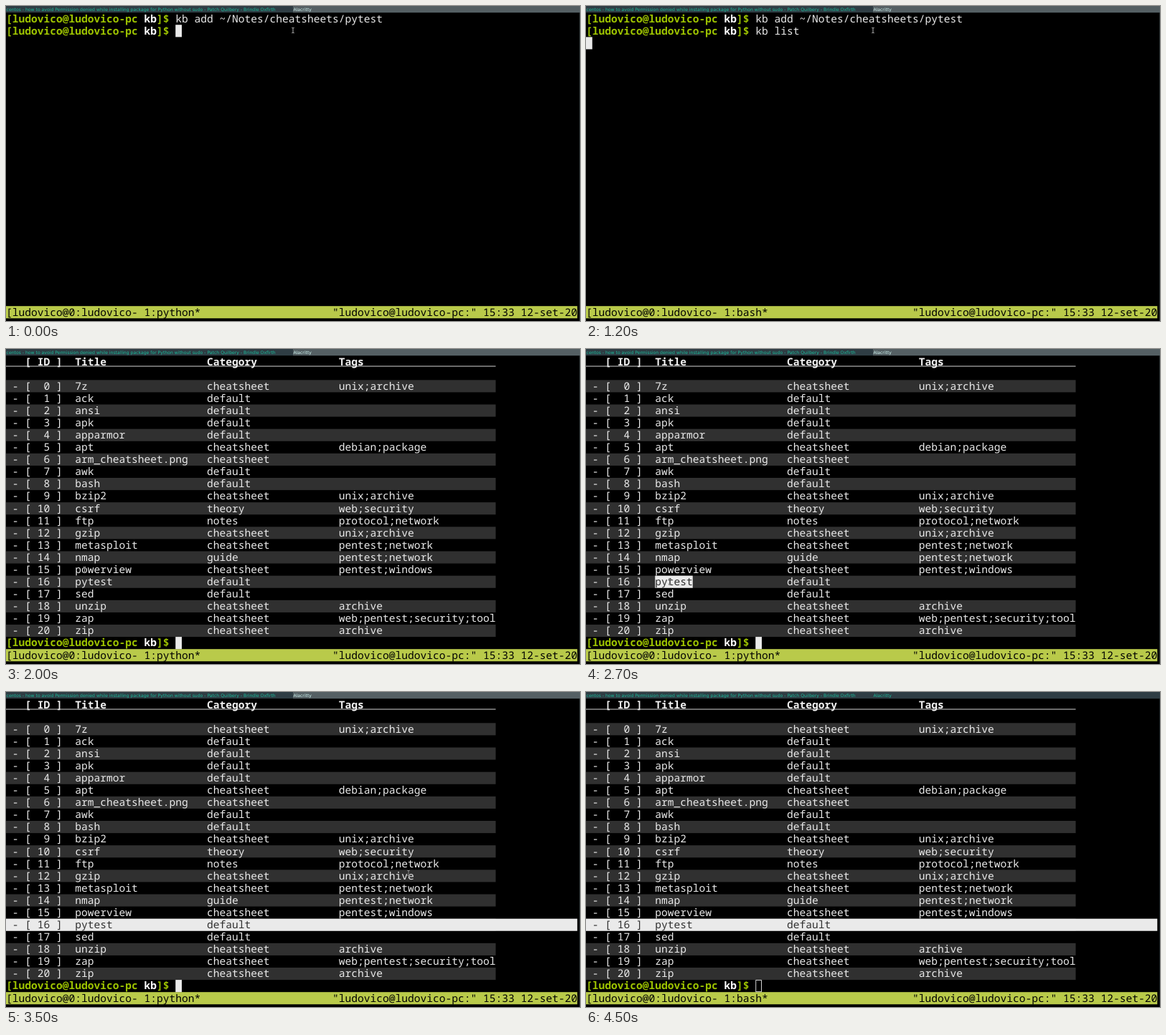
An HTML page for the animation above (5.3 s loop, 800 by 440 pixels).

```html
<!DOCTYPE html>
<html lang="en">
<head>
<meta charset="utf-8">
<title>Terminal listing</title>
<style>
html, body { margin: 0; width: 800px; height: 440px; overflow: hidden; background: #000; }
svg { display: block; }
text { white-space: pre; text-rendering: geometricPrecision; }
.mono { font: 14.5833px "Noto Sans Mono", "DejaVu Sans Mono", monospace; }
.bar { font: 6.11px "DejaVu Sans", sans-serif; }
.bold { font-weight: 700; }
</style>
</head>
<body>
<svg id="stage" width="800" height="440" viewBox="0 0 800 440"></svg>
<script>
const LOOP = 5300, CW = 8.75, RH = 17.0833, TOP = 9.1667;
const FG = '#eaeaea', GREEN = '#9ec400', LIME = '#b9ca4a', STRIPE = '#303030';
const BAR = '#2f3d44', BAR_ON = '#556064', TEAL = '#1abc9c', PALE = '#d0f6f3';
const USER = 'ludovico', HOST = USER + '-pc';
const stage = document.getElementById('stage');

function add(parent, tag, attrs, str) {
  const el = document.createElementNS('http://www.w3.org/2000/svg', tag);
  for (const k in attrs) el.setAttribute(k, attrs[k]);
  if (str !== undefined) el.textContent = str;
  parent.appendChild(el);
  return el;
}
const group = () => add(stage, 'g', {});
const rowY = row => TOP + row * RH;

// Terminal cells: text and background blocks by column and row
function put(parent, col, row, str, fill = FG, bold = false) {
  return add(parent, 'text', {
    x: col * CW, y: rowY(row) + 13.4, fill, class: bold ? 'mono bold' : 'mono'
  }, str);
}
function block(parent, col, row, cols, fill) {
  return add(parent, 'rect', { x: col * CW, y: rowY(row), width: cols * CW, height: RH, fill });
}
function prompt(parent, row) {
  put(parent, 0, row, `[${USER}@${HOST}`, GREEN, true);
  put(parent, 22, row, 'kb', '#fff', true);
  put(parent, 24, row, ']$', GREEN, true);
}
function show(el, on) { el.style.display = on ? '' : 'none'; }

add(stage, 'rect', { width: 800, height: 440, fill: '#000' });

// Window titles
add(stage, 'rect', { width: 800, height: TOP, fill: BAR });
const tab = add(stage, 'rect', { x: 400, width: 400, height: TOP, fill: BAR_ON });
add(stage, 'text', { x: 0.6, y: 6.7, fill: TEAL, class: 'bar' },
  'centos - how to avoid Permission denied while installing package for Python without sudo - Patch Quilbery - Brindle Oxfirth');
const tabName = add(stage, 'text', { x: 400.4, y: 6.7, class: 'bar' }, 'Alacritty');
const edge = add(stage, 'rect', { x: 799.5, y: TOP, width: 0.5, height: 440 - TOP });

// Shell before the listing
const shell = group();
prompt(shell, 0);
put(shell, 27, 0, 'kb add ~/Notes/cheatsheets/pytest');
prompt(shell, 1);
const typed = put(shell, 27, 1, '');

// Listing
const C = 'cheatsheet', D = 'default';
const items = [
  ['7z', C, 'unix;archive'], ['ack', D], ['ansi', D], ['apk', D], ['apparmor', D],
  ['apt', C, 'debian;package'], ['arm_cheatsheet.png', C], ['awk', D], ['bash', D],
  ['bzip2', C, 'unix;archive'], ['csrf', 'theory', 'web;security'],
  ['ftp', 'notes', 'protocol;network'], ['gzip', C, 'unix;archive'],
  ['metasploit', C, 'pentest;network'], ['nmap', 'guide', 'pentest;network'],
  ['powerview', C, 'pentest;windows'], ['pytest', D], ['sed', D],
  ['unzip', C, 'archive'], ['zap', C, 'web;pentest;security;tool'], ['zip', C, 'archive']
];
function entry(parent, id, fill) {
  const row = id + 2, [name, kind, tags = ''] = items[id];
  put(parent, 1, row, '-', fill);
  put(parent, 3, row, '[', fill);
  put(parent, id < 10 ? 6 : 5, row, id, fill);
  put(parent, 8, row, ']', fill);
  put(parent, 11, row, name, fill);
  put(parent, 32, row, kind, fill);
  put(parent, 53, row, tags, fill);
}
const list = group();
[[3, '['], [5, 'ID'], [8, ']'], [11, 'Title'], [32, 'Category'], [53, 'Tags']]
  .forEach(([col, str]) => put(list, col, 0, str, '#f2f2f2', true));
add(list, 'rect', { y: 23.6, width: 78 * CW, height: 0.9, fill: FG });
items.forEach((_, id) => {
  if (id % 2 === 0) block(list, 0, id + 2, 78, STRIPE);
  entry(list, id, FG);
});
prompt(list, 23);

// Selections: a word, then its whole line
const word = group();
block(word, 11, 18, 6, FG);
put(word, 11, 18, 'pytest', STRIPE);
const line = group();
block(line, 0, 18, 91, FG);
entry(line, 16, STRIPE);

// Status line
block(stage, 0, 24, 91, LIME);
const status = put(stage, 0, 24, '', '#000');
put(stage, 52, 24, `"${USER}@${HOST}:" 15:33 12-set-20`, '#000');

const cursor = block(stage, 0, 0, 1, FG);
const hollow = add(stage, 'rect', {
  x: 27 * CW + 0.5, y: rowY(23) + 0.5, width: CW - 1, height: RH - 1,
  fill: 'none', stroke: FG, 'stroke-width': 0.9
});

// Mouse pointer
const beam = group();
const shape = 'M-1.7-3.7Q0-3.7 0-2.8Q0-3.7 1.7-3.7M0-2.8V2.8M-1.7 3.7Q0 3.7 0 2.8Q0 3.7 1.7 3.7';
add(beam, 'path', { d: shape, fill: 'none', stroke: '#000', 'stroke-width': 1.7 });
add(beam, 'path', { d: shape, fill: 'none', stroke: '#ddd', 'stroke-width': 0.8 });

const clamp = u => Math.max(0, Math.min(1, u));
const smooth = u => u * u * (3 - 2 * u);
const mix = (a, b, u) => a.map((v, i) => v + (b[i] - v) * u);
const REST = [400, 34], NEAR = [109.5, 308], PICK = [117, 325], HOVER = [561, 253], OUT = [815, 212];

function pointer(t) {
  if (t < 2000) return mix(REST, NEAR, smooth(clamp((t - 1400) / 600)));
  if (t < 3100) return mix(NEAR, PICK, smooth(clamp((t - 2000) / 600)));
  if (t < 3500) return mix(PICK, HOVER, Math.pow((t - 3100) / 400, 1.6));
  return mix(HOVER, OUT, clamp((t - 3500) / 200));
}

// Number of typed letters from each moment on
const keys = [[300, 1], [400, 2], [500, 3], [600, 4], [700, 6], [900, 7]];

function draw(time) {
  const t = Math.floor(time / 100) * 100;
  const listed = t >= 1300, focus = t < 3700, entered = t >= 1000;
  show(shell, !listed);
  show(list, listed);
  show(word, t >= 2700 && t < 3000);
  show(line, t >= 3000);

  const count = keys.reduce((n, [at, k]) => t >= at ? k : n, 0);
  typed.textContent = 'kb list'.slice(0, count);
  const col = listed ? 27 : entered ? 0 : 27 + count;
  const row = listed ? 23 : entered ? 2 : 1;
  cursor.setAttribute('x', col * CW);
  cursor.setAttribute('y', rowY(row));
  show(cursor, focus);
  show(hollow, !focus);

  const python = t < 200 || (listed && t < 4300);
  status.textContent = `[${USER}@0:${USER}- 1:${python ? 'python' : 'bash'}*`;

  tab.setAttribute('fill', focus ? BAR_ON : BAR);
  edge.setAttribute('fill', focus ? BAR_ON : BAR);
  tabName.setAttribute('fill', focus ? PALE : TEAL);

  const [x, y] = pointer(t);
  beam.setAttribute('transform', `translate(${x} ${y})`);
  show(beam, focus);
}

const start = performance.now();
function tick() {
  draw((performance.now() - start) % LOOP);
  requestAnimationFrame(tick);
}
draw(0);
tick();
</script>
</body>
</html>
```
